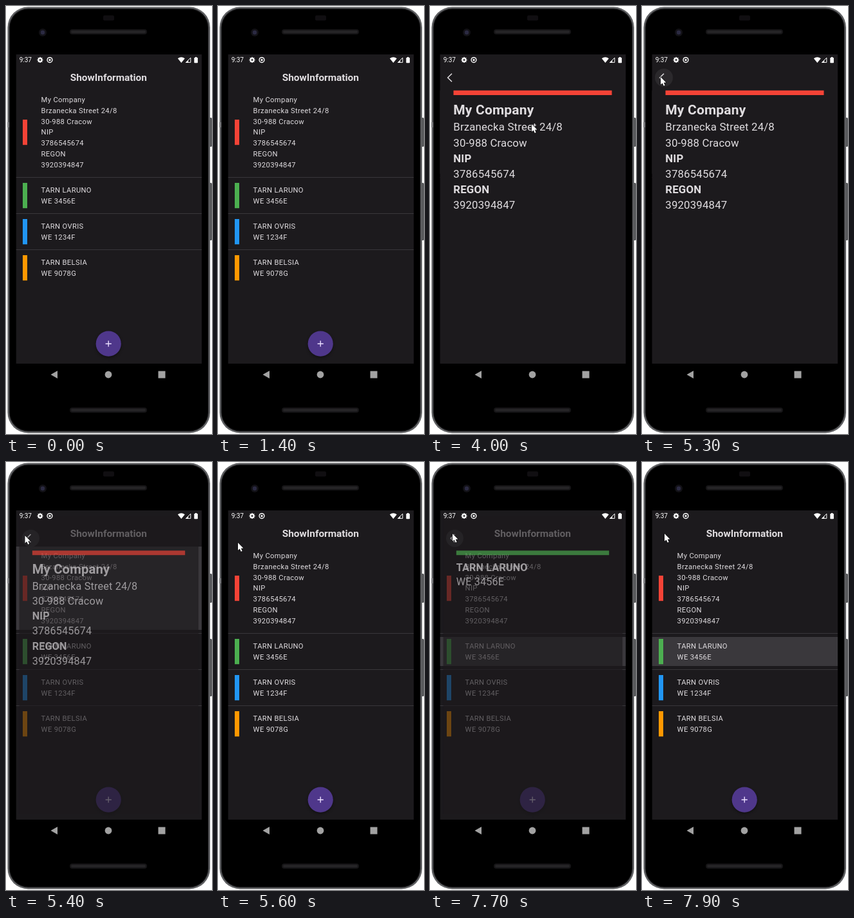
An HTML page with a canvas for the animation above (8000 ms loop, 320 by 663 pixels).

```html
<!DOCTYPE html>
<html lang="en">
<head>
<meta charset="utf-8">
<title>ShowInformation</title>
<style>
html, body { margin: 0; width: 100%; height: 100%; overflow: hidden; background: #fff; }
canvas { display: block; width: 320px; height: 663px; }
</style>
</head>
<body>
<canvas id="stage"></canvas>
<script>
const W = 320, H = 663, LOOP = 8000, STEP = 100;
const DP = 0.7; // stage pixels per app unit
const SCREEN = { x: 15.5, y: 75, w: 288.5, h: 479 };
const BG = '#1c1a1d', INK = '#e0dde0', GLOW = '#3a383c', WHITE = '#fff';
const ROW_H = 56, LINE_H = 24 * DP, LIST_END = 433;

const rows = [
  { color: '#f44336', lines: ['My Company', 'Brzanecka Street 24/8', '30-988 Cracow',
    'NIP', '3786545674', 'REGON', '3920394847'] },
  { color: '#4caf50', lines: ['TARN LARUNO', 'WE 3456E'] },
  { color: '#2196f3', lines: ['TARN OVRIS', 'WE 1234F'] },
  { color: '#ff9800', lines: ['TARN BELSIA', 'WE 9078G'] }
];

// Stack the rows upwards from the end of the list.
let edge = LIST_END;
for (const row of [...rows].reverse()) {
  row.h = ROW_H + (row.lines.length - 2) * LINE_H;
  edge -= row.h;
  row.top = edge;
  row.mid = edge + row.h / 2;
}

const visits = [
  { row: rows[0], tap: 3600, back: 5300 },
  { row: rows[1], tap: 6400, back: 7600 }
];
const stops = [
  { x: 205, y: 290, from: 3400, to: 3400 },
  { x: 158, y: 183, from: 3600, to: 4200 },
  { x: 29, y: 110, from: 5100, to: 5300 },
  { x: 31, y: 125, from: 5600, to: 5600 },
  { x: 106.5, y: 286.5, from: 6000, to: 6800 },
  { x: 35, y: 111, from: 7600, to: LOOP }
];

const canvas = document.getElementById('stage');
const ctx = canvas.getContext('2d');
const dpr = window.devicePixelRatio || 1;
canvas.width = Math.round(W * dpr);
canvas.height = Math.round(H * dpr);

function ramp(t, a, b) {
  return Math.min(1, Math.max(0, (t - a) / (b - a)));
}

function smooth(t, a, b) {
  const u = ramp(t, a, b);
  return u * u * (3 - 2 * u);
}

function rect(x, y, w, h, fill) {
  ctx.fillStyle = fill;
  ctx.fillRect(x, y, w, h);
}

function round(x, y, w, h, r, fill) {
  ctx.beginPath();
  ctx.roundRect(x, y, w, h, r);
  ctx.fillStyle = fill;
  ctx.fill();
}

function disc(x, y, r, fill) {
  ctx.beginPath();
  ctx.arc(x, y, r, 0, Math.PI * 2);
  ctx.fillStyle = fill;
  ctx.fill();
}

function path(points, closed) {
  ctx.beginPath();
  points.forEach(([x, y], i) => i ? ctx.lineTo(x, y) : ctx.moveTo(x, y));
  if (closed) ctx.closePath();
}

function poly(points, fill) {
  path(points, true);
  ctx.fillStyle = fill;
  ctx.fill();
}

function line(points, color, width) {
  path(points, false);
  ctx.strokeStyle = color;
  ctx.lineWidth = width;
  ctx.stroke();
}

function text(str, x, y, size, weight = 400, spacing = 0, align = 'left', fill = INK) {
  ctx.font = `${weight} ${size}px Roboto, sans-serif`;
  ctx.letterSpacing = spacing + 'px';
  ctx.textAlign = align;
  ctx.fillStyle = fill;
  ctx.fillText(str, x, y);
}

function withAlpha(a, draw) {
  if (a <= 0) return;
  ctx.save();
  ctx.globalAlpha *= a;
  draw();
  ctx.restore();
}

function speaker(y) {
  round(99, y, 120, 8, 4, '#161517');
  round(101, y + 2, 116, 4, 2, '#252426');
}

function drawPhone() {
  rect(0, 0, W, H, WHITE);
  for (const [y, h] of [[173, 45], [274, 89]]) round(315, y, 5, h, 1.5, '#5c5d60');

  const shells = ['#4a4b4d', '#77787b', '#2c2c2e', '#0d0d0e', '#000'];
  shells.forEach((fill, i) =>
    round(2.5 + i, 1.5 + i, 314.5 - 2 * i, 660 - 2 * i, 32 - i, fill));
  rect(2, 180, 3, 8, '#7b7c7e');

  round(151, 14.5, 17, 8, 2, '#100e11');
  speaker(36);
  speaker(622);
  disc(57, 41, 6, '#131217');
  disc(57, 41, 3.2, '#2b2a42');

  const nav = '#a2a2a2';
  poly([[69.5, 571], [80, 565], [80, 577]], nav);
  disc(159, 571, 5.4, nav);
  rect(236.5, 565.5, 11, 11, nav);
}

function drawStatus() {
  text('9:37', 20.7, 87.4, 10, 400, 0, 'left', WHITE);

  const y = 83.6;
  for (let i = 0; i < 4; i++) {
    const a = i * Math.PI / 4, dx = 4.5 * Math.cos(a), dy = 4.5 * Math.sin(a);
    line([[53 - dx, y - dy], [53 + dx, y + dy]], WHITE, 1.6);
  }
  disc(53, y, 3.4, WHITE);
  disc(53, y, 1.4, BG);

  disc(68, y, 4.6, WHITE);
  disc(68, y, 3.2, BG);
  disc(68, y, 1.7, WHITE);

  ctx.beginPath();
  ctx.moveTo(272.3, 88);
  ctx.lineTo(266.8, 81.3);
  ctx.quadraticCurveTo(272.3, 77.2, 277.8, 81.3);
  ctx.fillStyle = WHITE;
  ctx.fill();

  line([[279.5, 87.4], [286.8, 80.2], [286.8, 87.4], [279.5, 87.4]], WHITE, 1);
  poly([[278.8, 88], [283.2, 83.6], [283.2, 88]], WHITE);

  round(292.3, 80, 5.6, 8.3, 0.8, WHITE);
  rect(293.9, 79, 2.4, 1.4, WHITE);
}

function drawList(visit, glow) {
  rect(SCREEN.x, SCREEN.y, SCREEN.w, SCREEN.h, BG);
  text('ShowInformation', 159.3, 116.2, 22 * DP, 700, 0, 'center');

  withAlpha(glow, () =>
    rect(SCREEN.x, visit.row.top + 6, SCREEN.w, visit.row.h - 11, GLOW));

  for (const row of rows) {
    if (row !== rows[0]) rect(SCREEN.x, row.top, SCREEN.w, 1, '#39373b');
    rect(26, row.mid - 19, 10 * DP, ROW_H * DP, row.color);
    const first = row.mid + 4.4 - (row.lines.length - 1) * LINE_H / 2;
    row.lines.forEach((s, i) =>
      text(s, 54.6, first + i * LINE_H, 16 * DP, 400, 0.5 * DP));
  }

  const x = 159.2, y = 523.2, r = 4.6;
  ctx.save();
  ctx.shadowColor = 'rgba(0,0,0,.4)';
  ctx.shadowBlur = 4 * dpr;
  ctx.shadowOffsetY = 2 * dpr;
  disc(x, y, 28 * DP, '#4f378b');
  ctx.restore();
  line([[x - r, y], [x + r, y]], '#eaddff', 1.4);
  line([[x, y - r], [x, y + r]], '#eaddff', 1.4);
}

function drawDetail(row, hover) {
  rect(SCREEN.x, SCREEN.y, SCREEN.w, SCREEN.h, BG);
  withAlpha(hover, () => disc(34, 111, 14, '#2b292c'));
  line([[34, 104.7], [27.6, 111], [34, 117.3]], INK, 1.5);
  rect(36.5, 130.8, 246, 7.2, row.color);

  const big = row === rows[0];
  const [head, ...rest] = row.lines;
  const size = 24 * DP, spacing = 0.25 * DP;
  text(head, 36.3, big ? 167.6 : 163.2, big ? 30 * DP : size, 700, spacing);
  rest.forEach((s, i) => {
    const weight = /^[A-Z]+$/.test(s) ? 700 : 400;
    text(s, 36.3, (big ? 193.4 : 186.4) + i * 24.1, size, weight, spacing);
  });
}

function drawCursor(t) {
  const i = stops.findLastIndex(s => s.from <= t);
  if (i < 0) return;
  const a = stops[i], b = stops[i + 1] || a;
  const u = b === a ? 0 : smooth(t, a.to, b.from);
  ctx.save();
  ctx.translate(a.x + (b.x - a.x) * u, a.y + (b.y - a.y) * u);
  const arrow = [[0, 0], [0, 11.8], [2.7, 9.4], [4.7, 13.8], [6.7, 12.9], [4.8, 8.7], [8.4, 8.5]];
  path(arrow, true);
  ctx.lineJoin = 'round';
  ctx.strokeStyle = '#0b0b0c';
  ctx.lineWidth = 1.4;
  ctx.stroke();
  poly(arrow, WHITE);
  ctx.restore();
}

function draw(t) {
  const visit = visits[t < 6000 ? 0 : 1];
  const { row, tap, back } = visit;
  const open = smooth(t, tap, tap + 250) - smooth(t, back, back + 250);
  const hover = ramp(t, back - 200, back);
  const glow = ramp(t, tap - 200, tap) - ramp(t, back + 100, back + 300) * (row === rows[0]);

  ctx.setTransform(dpr, 0, 0, dpr, 0, 0);
  drawPhone();

  ctx.save();
  ctx.beginPath();
  ctx.rect(SCREEN.x, SCREEN.y, SCREEN.w, SCREEN.h);
  ctx.clip();
  drawList(visit, glow);
  withAlpha(open, () => {
    const scale = 0.9 + 0.1 * open;
    const cx = SCREEN.x + SCREEN.w / 2, cy = SCREEN.y + SCREEN.h / 2;
    ctx.translate(cx, cy);
    ctx.scale(scale, scale);
    ctx.translate(-cx, -cy);
    drawDetail(row, hover);
  });
  ctx.restore();

  drawStatus();
  drawCursor(t);
}

const start = performance.now();
function tick() {
  const t = (performance.now() - start) % LOOP;
  draw(Math.floor(t / STEP) * STEP);
  requestAnimationFrame(tick);
}
tick();
</script>
</body>
</html>
```
